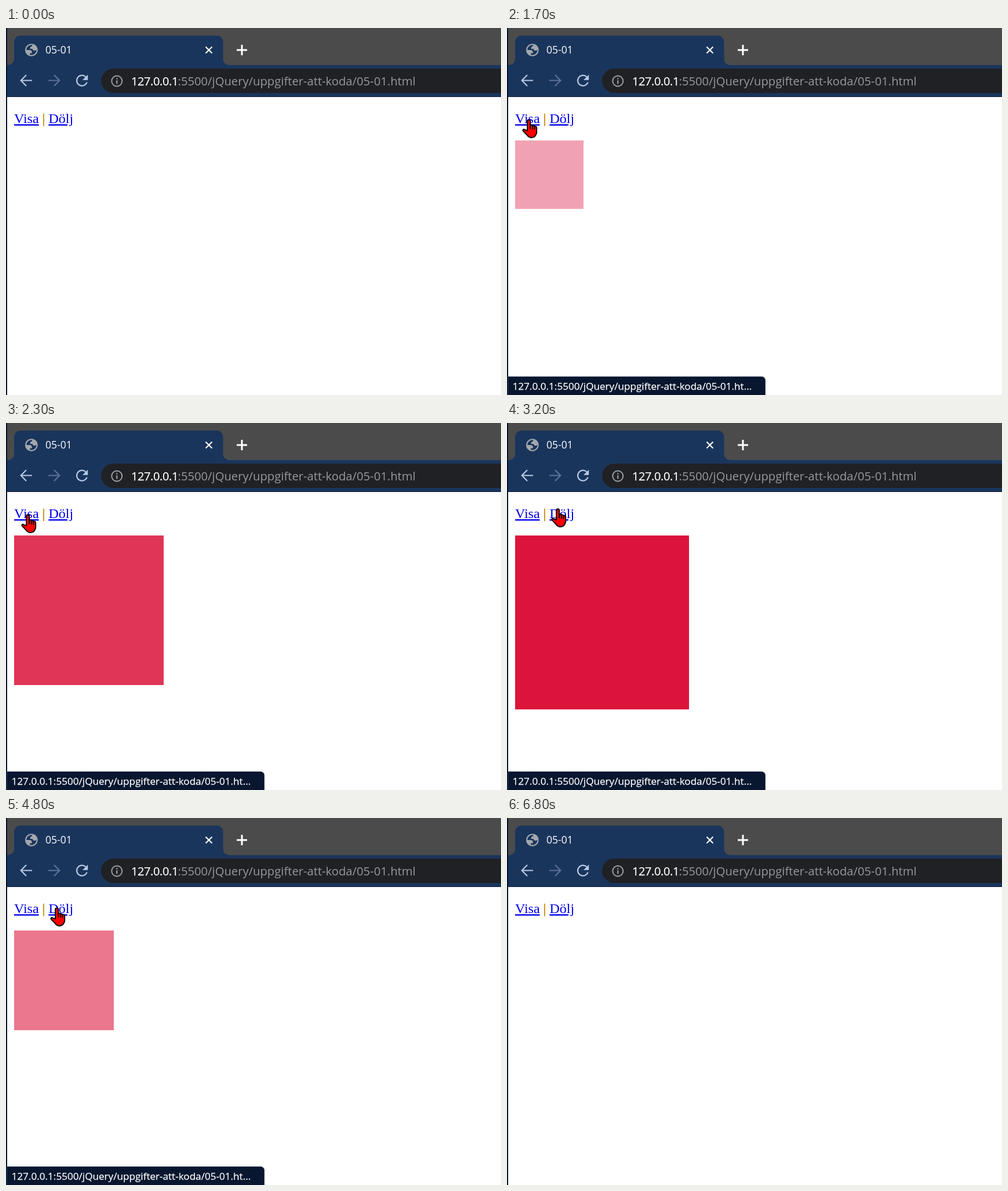
These frames come from a looping animation (854x633 px, 6900 ms). An HTML page:

```html
<!DOCTYPE html>
<html lang="sv">
<head>
<meta charset="utf-8">
<title>05-01</title>
<style>
html, body { margin: 0; width: 100%; height: 100%; overflow: hidden; background: #fff; }
svg { display: block; width: 854px; height: 633px; }
.ui { font-family: "Open Sans", "Noto Sans", sans-serif; fill: #fff; }
.strong { stroke: #fff; stroke-width: .25; }
.dim { fill: #95999e; }
.page { font: 24px "Liberation Serif", "Times New Roman", serif; }
.link { fill: #0000ee; text-decoration: underline; }
.bar { fill: #c98200; stroke: #c98200; stroke-width: .6; }
.line { fill: none; stroke: #fff; stroke-width: 2.2; }
.thick { stroke-width: 3; }
.icon { fill: none; stroke: #b7c9e4; stroke-width: 2.2; }
.off { stroke: #5c7396; }
.cursor { fill: #f00; stroke: #000; stroke-width: 1.9; stroke-linejoin: round; stroke-linecap: round; }
</style>
</head>
<body>
<svg viewBox="0 0 854 633">
  <defs>
    <path id="back" d="M10 0H-9M0-9.5L-9.3 0L0 9.5"/>
    <clipPath id="stage"><rect width="854" height="633"/></clipPath>
  </defs>

  <!-- browser frame -->
  <rect width="854" height="64" fill="#4b4b4b"/>
  <rect y="64" width="854" height="54" fill="#1a355c"/>
  <path fill="#1a355c" d="M2 64C9 64 14 60 14 53V24a11 11 0 0 1 11-11H363.5a11 11 0 0 1 11 11V53c0 7 5 11 12 11z"/>
  <rect y="118" width="854" height="1" fill="#0b1b33"/>
  <rect x="164" y="70" width="720" height="42" rx="21" fill="#202124"/>

  <!-- tab -->
  <path fill="#a3a8ae" fill-rule="evenodd" transform="translate(30.9 25) scale(1.08)" d="M12 2a10 10 0 1 0 0 20 10 10 0 0 0 0-20zM4 12h4.4c3.4 0 4.9 1.7 4.5 5.1H9.5v2.5A8 8 0 0 0 20 11.5C19.3 12.5 18.3 13 17 13c-2.1 0-3.2-.9-3.2-2.75H10c-.3-2.7.7-4.1 2.9-4.1 0-1 .3-1.6.8-2A8 8 0 0 0 4 12z"/>
  <text class="ui" x="68" y="44" font-size="17.6">05-01</text>
  <path class="line" d="M344.5 32.5l11 11m0-11l-11 11"/>
  <path class="line thick" d="M398 38h18M407 29v18"/>

  <!-- toolbar -->
  <use href="#back" class="icon" transform="translate(35 90.5)"/>
  <use href="#back" class="icon off" transform="translate(83 90.5) scale(-1 1)"/>
  <path class="icon" d="M137.4 84.2A9 9 0 1 0 139.6 93.5"/>
  <path fill="#b7c9e4" d="M141.2 80.5v9.2H132z"/>
  <circle cx="191.3" cy="91.5" r="9" fill="none" stroke="#9aa0a6" stroke-width="2"/>
  <path fill="#9aa0a6" d="M190.2 90.2h2.2v6.3h-2.2zM190.2 86.2h2.2v2.3h-2.2z"/>
  <text class="ui strong" x="216" y="99" font-size="20" letter-spacing="-.4">127.0.0.1</text>
  <text class="ui dim" x="296.5" y="99" font-size="20.23">:5500/jQuery/uppgifter-att-koda/05-01.html</text>

  <!-- page -->
  <text class="page" x="14" y="164"><tspan class="link">Visa</tspan><tspan class="bar"> | </tspan><tspan class="link">Dölj</tspan></text>
  <rect id="box" x="14" y="194" fill="crimson"/>
  <rect width="2" height="633" fill="#06152d"/>

  <g id="status">
    <path fill="#08172f" stroke="#2c3a50" d="M1.5 634V601.5H439.5a6 6 0 0 1 6 6V634z"/>
    <text class="ui strong" x="9.5" y="624" font-size="17.13">127.0.0.1:5500/jQuery/uppgifter-att-koda/05-01.ht...</text>
  </g>

  <g clip-path="url(#stage)">
    <g id="hand" class="cursor">
      <path d="M9.2 20V3.7a2.5 2.5 0 0 1 5 0V11c1-1.4 3.4-1 3.7.8 1-1 3.2-.6 3.5 1 1.4-.8 3.8 0 3.8 2.2v8c0 2.5-1 4-2.2 5.6-1.4 2.2-3.5 3.4-6.5 3.4-4 0-6-1.6-7.6-4L1.9 20.6c-1.4-2 .8-3.6 2.6-2.2z"/>
      <path fill="none" d="M14.2 11v5.5M17.9 12v5M21.4 13v4.5"/>
    </g>
    <path id="arrow" class="cursor" d="M1 1V24l5.5-5 4 9 4-2-4-8.5H19z"/>
  </g>
</svg>

<script>
const LOOP = 6900, TICK = 100;
const $ = id => document.getElementById(id);
const [box, status, hand, arrow] = ["box", "status", "hand", "arrow"].map($);

// time, shape, x, y
const path = [
  [0, null, 0, 0],
  [100, arrow, 666, 70], [200, arrow, 560, 122], [300, arrow, 413, 148],
  [400, arrow, 240, 147], [500, arrow, 125, 150], [600, hand, 42, 156],
  [700, hand, 26, 157],
  [3100, hand, 56, 144], [3200, hand, 76, 147],
  [3900, hand, 76, 151], [4000, hand, 76, 154],
  [6100, arrow, 135, 149], [6200, arrow, 413, 150],
  [6300, arrow, 670, 112], [6400, arrow, 836, 67],
  [6500, null, 0, 0]
];

const clamp = v => Math.min(1, Math.max(0, v));
const swing = p => 0.5 - Math.cos(Math.PI * clamp(p)) / 2;

function boxScale(t) {
  if (t < 1300 || t >= 6100) return 0;
  if (t < 3900) return swing((t - 901) / 1850);
  return 1 - swing((Math.min(t, 5500) - 3986) / 1800);
}

function draw(t) {
  const k = boxScale(t), size = Math.round(300 * k);
  box.setAttribute("width", size);
  box.setAttribute("height", size);
  box.setAttribute("opacity", k);

  const shown = t < 6400 ? clamp((t - 700) / 300) : clamp((6600 - t) / 300);
  status.setAttribute("opacity", shown);

  const [, shape, x, y] = path.filter(p => p[0] <= t).pop();
  for (const c of [hand, arrow]) c.style.display = c === shape ? "" : "none";
  if (shape) shape.setAttribute("transform", `translate(${x} ${y})`);
}

const start = performance.now();
function loop() {
  const t = (performance.now() - start) % LOOP;
  draw(Math.floor(t / TICK) * TICK);
  requestAnimationFrame(loop);
}
draw(0);
requestAnimationFrame(loop);
</script>
</body>
</html>
```
